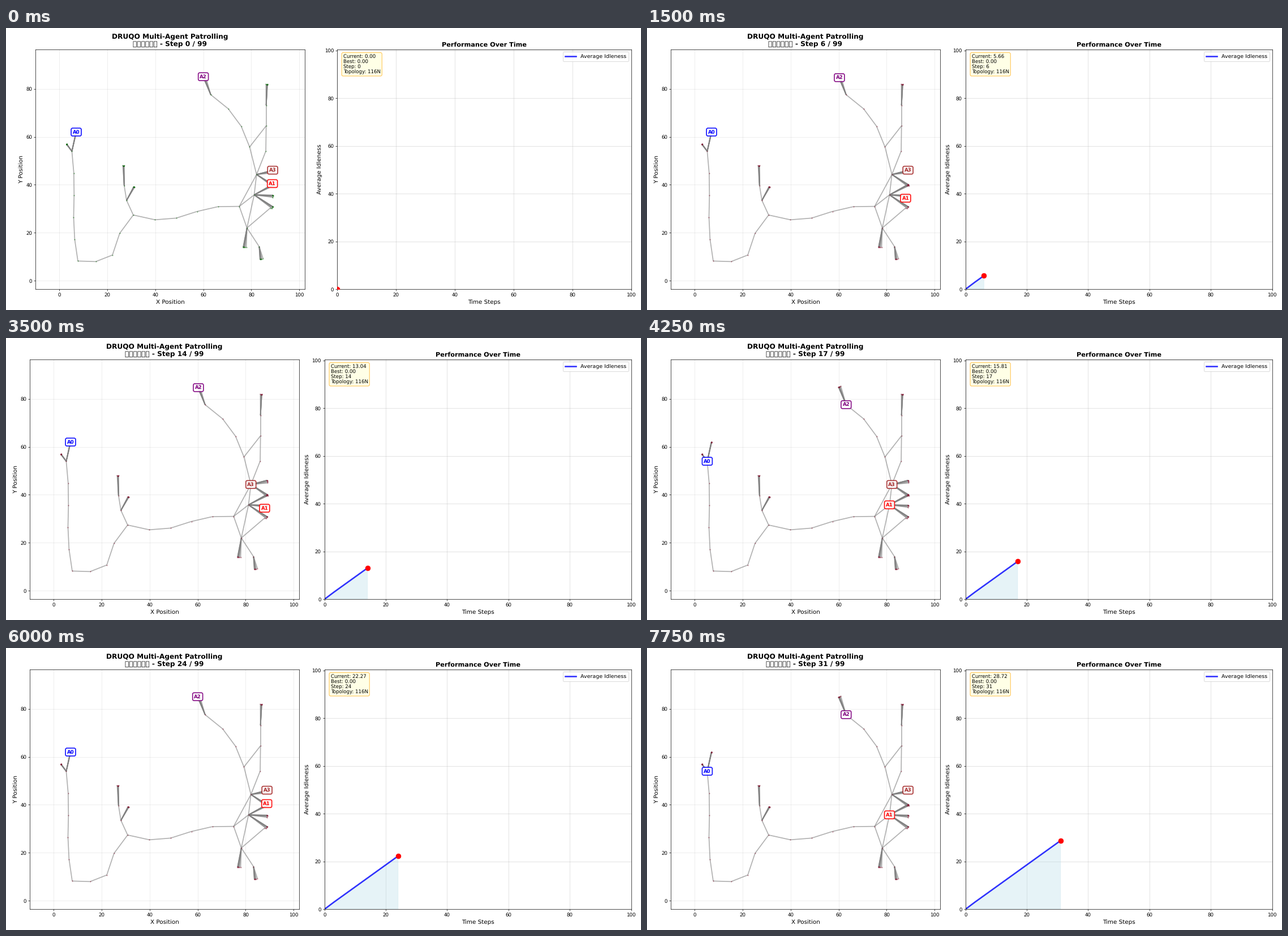
A matplotlib script that plays this animation: 1122 by 499 pixels, repeating every 8000 ms.

```python
import math
import random

import matplotlib.pyplot as plt
from matplotlib.animation import FuncAnimation
from matplotlib.collections import LineCollection

W, H, DPI = 1122, 499, 62.375
STEPS, STEP_MS = 32, 250
BOTTOM, HEIGHT = 36.8, 424.6
MAP_WIDTH, RIGHT = 475.2, 1104.5
LEAVES = 8

plt.rcParams.update({
    "font.family": "DejaVu Sans",
    "font.size": 10,
    "text.hinting": "none",
})

# Named junctions, in map units.
WEST, CORNER, BEND, FORK = (5.2, 54), (7.7, 8.2), (22.1, 10.7), (30.8, 27.4)
STEM, SPUR = (28, 33.5), (27, 39.7)
KNOT, HUB_C, HUB_D, HUB_E = (75, 31), (82.2, 44.3), (81.2, 35.8), (78.2, 22)
NORTH, EAST, UPPER, TOP = (79.3, 55.8), (86.2, 64.6), (86.2, 73.2), (63.1, 77.6)
SOUTH, PORT = (83.3, 14.2), (87.9, 30.3)

# Start, end, segments, bow, sway.
ROUTES = [
    (WEST, CORNER, 5, -.45, .6),
    (CORNER, BEND, 2, -1.5, 0),
    (BEND, FORK, 2, 1.5, 0),
    (FORK, KNOT, 5, -1.8, -1.75),
    (NORTH, TOP, 3, -2.7, 0),
    (HUB_C, EAST, 2, -1.9, 0),
]
LINKS = [
    (FORK, STEM), (STEM, SPUR), (KNOT, HUB_C), (KNOT, HUB_D), (KNOT, HUB_E),
    (HUB_C, HUB_D), (HUB_D, HUB_E), (HUB_C, NORTH), (NORTH, EAST),
    (EAST, UPPER), (HUB_E, SOUTH), (HUB_E, PORT),
]

# Hub, tip of the fan, sideways spread.
FANS = [
    (WEST, (7, 62), 0), (WEST, (3, 57), 0),
    (SPUR, (26.9, 48), .4), (STEM, (31, 39.2), -.5),
    (TOP, (60, 85), -1), (UPPER, (86.7, 81.9), .5),
    (HUB_C, (88.9, 46.1), -1.3), (HUB_C, (88.9, 40.2), -.8),
    (HUB_D, (88.9, 40.2), -.8), (HUB_D, (89, 35.7), -1),
    (HUB_D, (89, 30.9), -.9),
    (HUB_E, (76.7, 14.1), 1.3), (SOUTH, (83.7, 9), 1.3),
]

# Hub and the two tips visited in turn.
SHUTTLES = [
    (WEST, (7, 62), (7, 62)),
    (HUB_D, (88.8, 40.5), (87.9, 34.4)),
    (TOP, (60, 85.1), (60.3, 84.7)),
]


def frame_of(a, b):
    """Offset from a to b and the unit normal on its left."""
    dx, dy = b[0] - a[0], b[1] - a[1]
    size = math.hypot(dx, dy)
    return dx, dy, -dy / size, dx / size


def route(a, b, parts, bow, sway):
    dx, dy, nx, ny = frame_of(a, b)
    points = []
    for i in range(parts + 1):
        t = i / parts
        off = bow * math.sin(math.pi * t) + sway * math.sin(2 * math.pi * t)
        points.append((a[0] + t * dx + off * nx, a[1] + t * dy + off * ny))
    return points


def fan(hub, tip, spread):
    """Leaves crowd at the tip and thin out to one side."""
    rng = random.Random(4)
    _, _, nx, ny = frame_of(hub, tip)
    leaves = []
    for k in range(LEAVES):
        off = spread * (k / (LEAVES - 1)) ** 3
        leaves.append((tip[0] + off * nx + rng.uniform(-.12, .12),
                       tip[1] + off * ny + rng.uniform(-.12, .12)))
    return leaves


def build_graph():
    edges = list(LINKS)
    for args in ROUTES:
        points = route(*args)
        edges += zip(points, points[1:])
    for hub, tip, spread in FANS:
        edges += [(hub, leaf) for leaf in fan(hub, tip, spread)]
    nodes = {(round(x, 3), round(y, 3)) for edge in edges for x, y in edge}
    return sorted(nodes), edges


def agent_spots(step):
    """Most agents shuttle hub-tip every step; the last one rests twice."""
    spots = [hub if step % 2 else tips[step // 2 % 2]
             for hub, *tips in SHUTTLES]
    return spots + [HUB_C if step % 3 == 2 else (88.9, 46.1)]


def idleness(step):
    return (112 * min(step, 3) + 107 * max(step - 3, 0)) / 116


def place(ax, left, width):
    ax.set_position([left / W, BOTTOM / H, width / W, HEIGHT / H])


def style(ax, xlabel, ylabel, grid_alpha):
    ax.set_xlabel(xlabel, fontsize=12)
    ax.set_ylabel(ylabel, fontsize=12)
    ax.grid(True, alpha=grid_alpha)
    ax.set_axisbelow(True)


fig = plt.figure(figsize=(W / DPI, H / DPI), dpi=DPI, facecolor="white")
area = fig.add_axes([.1, .1, .3, .8])
perf = fig.add_axes([.5, .1, .3, .8])

area.set(xlim=(-9.93, 102.2), ylim=(-3.55, 96.55),
         xticks=range(0, 101, 20), yticks=range(0, 81, 20))
style(area, "X Position", "Y Position", .3)

nodes, edges = build_graph()
area.add_collection(LineCollection(edges, colors="gray", alpha=.6,
                                   linewidths=2, zorder=2), autolim=False)
dots = area.scatter(*zip(*nodes), s=5, alpha=.6, linewidths=0, zorder=3)
labels = [
    area.text(0, 0, f"A{i}", color=color, fontsize=10, weight="bold",
              ha="center", va="center", zorder=10 + i,
              bbox=dict(boxstyle="round,pad=0.3", facecolor="white",
                        edgecolor=color, linewidth=2, alpha=.9))
    for i, color in enumerate(["blue", "red", "purple", "brown"])
]

perf.set(xlim=(0, 100), ylim=(0, 100.5),
         xticks=range(0, 101, 20), yticks=range(0, 101, 20))
style(perf, "Time Steps", "Average Idleness", .5)
perf.set_title("Performance Over Time", fontsize=13, weight="bold")
line, = perf.plot([], [], color="blue", alpha=.8, lw=3,
                  label="Average Idleness")
shade = perf.fill([0, 0, 0], [0, 0, 0], color="lightblue", alpha=.3,
                  zorder=1)[0]
head = perf.scatter([0], [0], s=100, color="red", zorder=5)
perf.legend(loc="upper right", fontsize=11)
stats = perf.text(.02, .98, "", transform=perf.transAxes, va="top",
                  fontsize=10, linespacing=1.07,
                  bbox=dict(boxstyle="round,pad=0.3", facecolor="lightyellow",
                            edgecolor="orange", alpha=.8))

# Glyphs absent from the font, shown as empty boxes.
BOXES = "\u5b9e" * 6


def draw(step):
    # The panels settle quickly into their final layout.
    settle = .3 ** step
    left = 562.8 + 22.5 * settle
    place(area, 42.3 + 10 * settle, MAP_WIDTH)
    place(perf, left, RIGHT - left)

    area.set_title(f"DRUQO Multi-Agent Patrolling\n{BOXES} - Step {step} / 99",
                   fontsize=14, weight="bold")
    dots.set_facecolor("darkgreen" if step == 0
                       else "darkred" if step < 6 else "#80102c")
    for label, spot in zip(labels, agent_spots(step)):
        label.set_position(spot)

    xs = list(range(step + 1))
    ys = [idleness(x) for x in xs]
    line.set_data(xs, ys)
    head.set_offsets([(step, ys[-1])])
    shade.set_xy(list(zip(xs, ys)) + [(step, 0), (0, 0)])
    shade.set_visible(step >= 5)
    stats.set_text(f"Current: {ys[-1]:.2f}\nBest: 0.00\n"
                   f"Step: {step}\nTopology: 116N")
    return []


anim = FuncAnimation(fig, draw, frames=STEPS, interval=STEP_MS,
                     repeat=True, repeat_delay=0, blit=False)
plt.show()
```
